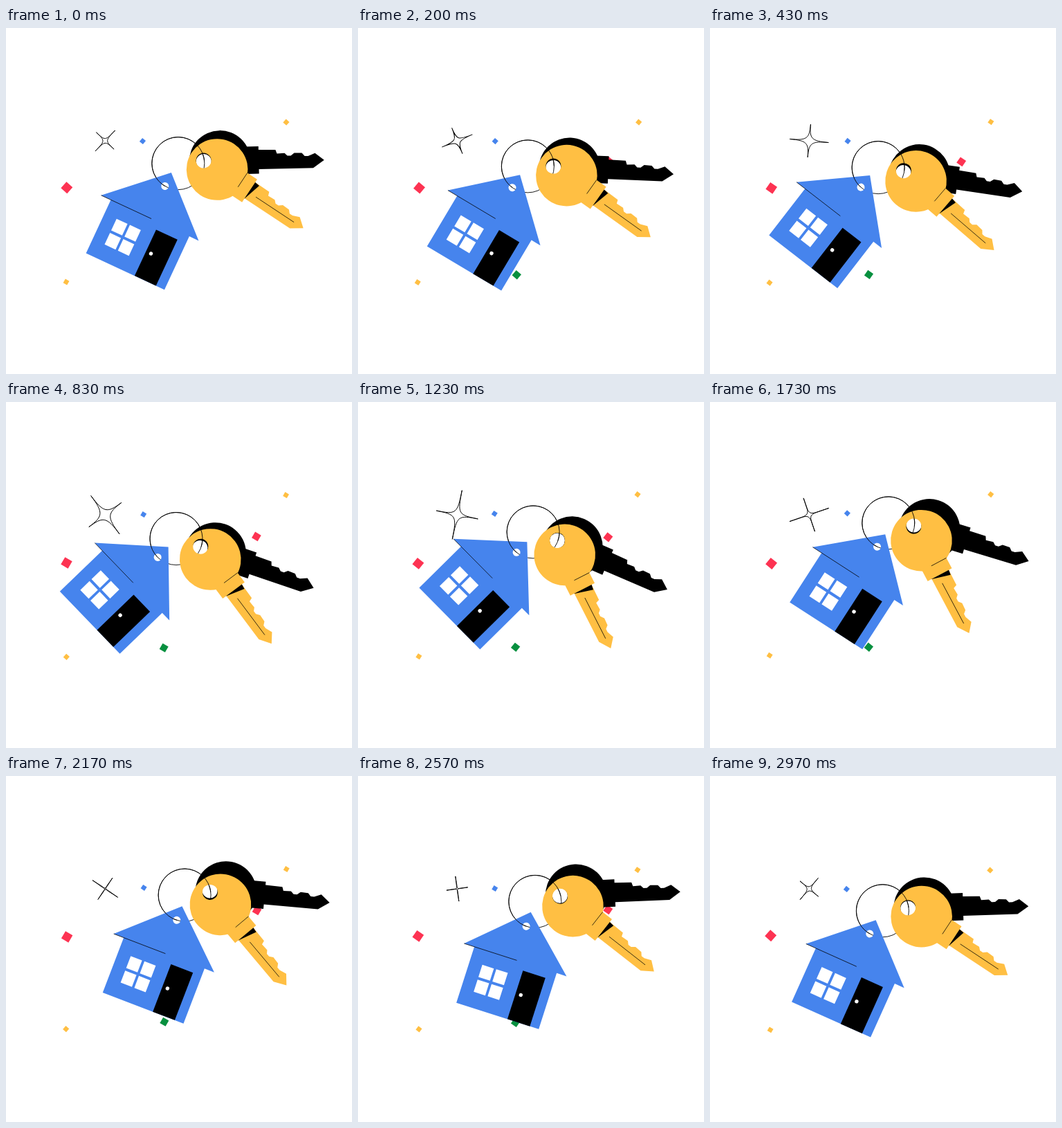
An HTML page that plays this animation: 500x500 px, repeating every 3000 ms.

```html
<!DOCTYPE html>
<html lang="en">
<head>
<meta charset="utf-8">
<title>House keys</title>
<style>
  html, body { margin: 0; width: 100%; height: 100%; overflow: hidden; background: #fff; }
  svg { display: block; width: 100vw; height: 100vh; }
  .line { fill: none; stroke: #000; stroke-width: .9; }
  .thin { stroke-width: .7; }
</style>
</head>
<body>
<svg viewBox="0 0 500 500">
  <defs>
    <!-- keys and house hang from the centre of their hole at 0,0 -->
    <g id="key">
      <path fill-rule="evenodd" d="M-20.9 0a44.3 44.3 0 1 0 88.6 0a44.3 44.3 0 1 0-88.6 0z
        M-11 0a11 11 0 1 0 22 0a11 11 0 1 0-22 0z"/>
      <path d="M60-20H79.5V-15L104-14.5 106-9 117-9.5 121-5.5H126L131-9.5 142-9 146-4.5H151L161-8.5
        174 2 158 13H79.5V19.5H60z"/>
    </g>
  </defs>
  <g id="bits"></g>
  <path id="star" class="line"/>
  <circle id="ring" class="line" r="38"/>
  <g id="house">
    <path fill="#4684ed" fill-rule="evenodd" d="M0-21.5L77.5 51H62.5V136H-62.5V51H-78z
      M-5.5 0a5.5 5.5 0 1 0 11 0a5.5 5.5 0 1 0-11 0z"/>
    <path class="line thin" d="M-78 51H2"/>
    <path fill="#fff" d="M-43.5 72.3h17.5v18.5h-17.5zM-22.3 72.3h17.5v18.5h-17.5z
      M-43.5 94.8h17.5v18.5h-17.5zM-22.3 94.8h17.5v18.5h-17.5z"/>
    <path d="M15 62.5H49V136H15z"/>
    <circle cx="22.8" cy="97" r="2.7" fill="#fff"/>
  </g>
  <use id="black" href="#key"/>
  <g id="gold">
    <use href="#key" fill="#ffbf43"/>
    <path d="M79.5-15L87-14 79.5 14z"/>
    <path class="line thin" d="M62.5-20V4.5M92 2.3H158"/>
  </g>
  <path id="arc" class="line"/>
</svg>
<script>
const LOOP = 3000, RING = 38, RAD = Math.PI / 180;
const $ = id => document.getElementById(id);

// Cosine swing that peaks at the given time, `cycles` times per loop.
const swing = (t, amp, peak, cycles = 1) =>
  amp * Math.cos(2 * Math.PI * cycles * (t - peak) / LOOP);

function place(el, x, y, angle) {
  el.setAttribute("transform", `translate(${x} ${y}) rotate(${angle})`);
}

// colour, side, centre, time of lowest position
const bits = [
  ["#fd3352", 12, 87.8, 232.2, 1500],
  ["#4684ed", 6.5, 198.2, 162.2, 200],
  ["#ffbf43", 6.5, 404.9, 134.8, 0],
  ["#ffbf43", 6.5, 87, 367, 750],
  ["#07903f", 9.5, 228.5, 355.5, 0],
  ["#fd3352", 10, 362.2, 194.2, 1500]
].map(([fill, side, x, y, low]) => {
  const el = document.createElementNS("http://www.w3.org/2000/svg", "rect");
  const attrs = { fill, width: side, height: side, x: -side / 2, y: -side / 2 };
  for (const name in attrs) el.setAttribute(name, attrs[name]);
  $("bits").append(el);
  return { el, x, y, low };
});

function starPath(p, k) {
  const q = p * 0.85;
  return `M0 ${-p}C0 ${-k} ${k} 0 ${q} 0C${k} 0 0 ${k} 0 ${p}` +
         `C0 ${k} ${-k} 0 ${-q} 0C${-k} 0 0 ${-k} 0 ${-p}z`;
}

function draw(now) {
  const t = now % LOOP;

  const cx = 252 + swing(t, 7.6, 2000) + swing(t, 1.4, 1240, 2);
  const cy = 187 + swing(t, 15, 496) + swing(t, 1, 0, 2);
  $("ring").setAttribute("cx", cx);
  $("ring").setAttribute("cy", cy);

  // Each part slides along the ring and turns about its own hole.
  const onRing = (angle, r = RING) =>
    [cx + r * Math.cos(angle * RAD), cy + r * Math.sin(angle * RAD)];
  const houseAt = 121 + swing(t, 14, 780);
  const blackAt = 4.2 + swing(t, 18, 980);
  const goldAt = 3.9 + swing(t, 15.9, 1085);
  place($("house"), ...onRing(houseAt), 32.3 + swing(t, 14.7, 1000));
  place($("black"), ...onRing(blackAt, 37), 10 + swing(t, 13.3, 1240));
  place($("gold"), ...onRing(goldAt, 37), 49 + swing(t, 15.6, 1450));

  // The upper part of the ring passes in front, from the house to the keys.
  $("arc").setAttribute("d",
    `M${onRing(houseAt)}A${RING} ${RING} 0 1 1 ${onRing(goldAt)}`);

  $("star").setAttribute("d",
    starPath(27.2 + swing(t, 9, 1130), -0.5 + swing(t, 4.3, 700)));
  place($("star"), 143.3, 163, 43.5 + 360 * t / LOOP);

  for (const { el, x, y, low } of bits)
    place(el, x + swing(t, 1, low + 375, 2), y + swing(t, 1.4, low), 36 + swing(t, 6, low, 2));
}

const start = performance.now();
(function tick() {
  draw(performance.now() - start);
  requestAnimationFrame(tick);
})();
</script>
</body>
</html>
```
